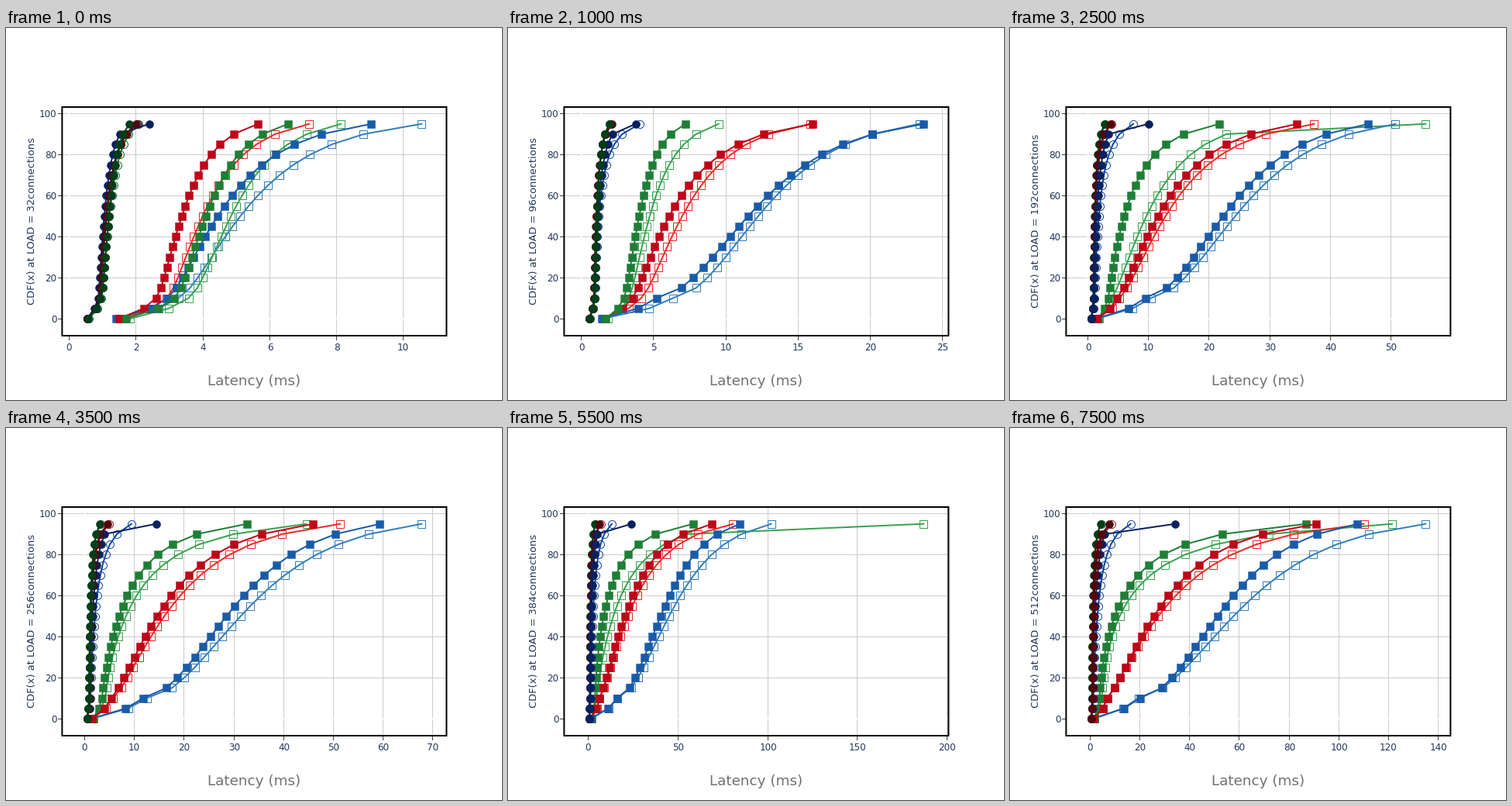
A matplotlib script that plays this animation: 640 px wide and 480 px high, repeating every 8000 ms.

```python
import numpy as np
import matplotlib.pyplot as plt
from matplotlib.animation import FuncAnimation
from matplotlib.patches import Rectangle

INTERVAL = 500
PT = 0.72  # points per pixel at 100 dpi
LEFT, RIGHT, TOP, BOTTOM = 72.4, 568.4, 102, 397
FIRST, LAST = 104.8, 536.2  # where the smallest and largest latency sit
INK, GRID = "#22365a", "#cccccc"
LEVELS = np.arange(0, 100, 5)

# Slowest regular latency (ms) at each load step; everything scales with it.
PACE = [10.54, 17, 23.4, 29.2, 41, 50.75, 57.8, 67.7,
        69.5, 80.9, 96.2, 101.9, 108, 114, 122, 134.8]
KEY_PACE = np.log([PACE[0], PACE[2], PACE[-1]])
SPIKES = {5: 55.7, 11: 186.8}  # outliers of the open green squares

# (marker, filled, hue): colour, minimum, then the 10th, 50th and 95th
# percentile at light, moderate and full load; a fourth value lifts the last point.
SERIES = {
    "s-r": ("#ec2a26", 1.6, (2.92, 3.99, 7.18), (4.13, 6.98, 15.85), (7, 27.5, 110)),
    "s-g": ("#38a34f", 1.83, (3.57, 4.84, 8.13), (3.28, 4.73, 9.5), (4.8, 12, 121.4)),
    "s-b": ("#337ebd", 1.5, (3.27, 5.12, 10.54), (6.34, 12.25, 23.4), (19.45, 57.7, 134.8)),
    "s+r": ("#be0619", 1.5, (2.6, 3.37, 5.65), (3.55, 6.08, 16), (7, 25.7, 91)),
    "s+g": ("#1f7e36", 1.7, (3.15, 4.09, 6.55), (2.95, 4, 7.2), (3.9, 9.95, 86.8)),
    "s+b": ("#1a5ba8", 1.4, (2.94, 4.44, 9.04), (5.2, 11.55, 23.7), (20.1, 51.2, 107.5)),
    "o-r": ("#a50f15", 0.55, (0.92, 1.12, 2.05), (0.88, 1.05, 2), (1.1, 1.5, 8.8)),
    "o-g": ("#0b6b2c", 0.6, (0.97, 1.2, 2.08), (0.9, 1.07, 1.95), (0.9, 1.25, 4.5)),
    "o-b": ("#0f459c", 0.55, (0.9, 1.1, 2.02), (0.95, 1.2, 4.03), (1.4, 3, 16.35)),
    "o+r": ("#55020d", 0.55, (0.92, 1.12, 2), (0.88, 1.03, 2.1), (1.1, 1.4, 7.9)),
    "o+g": ("#043d19", 0.56, (0.95, 1.19, 1.8), (0.9, 1.07, 1.93), (0.9, 1.2, 4.2)),
    "o+b": ("#08215f", 0.54, (0.87, 1.05, 1.75, 2.39), (0.9, 1.13, 2.8, 3.76),
            (1, 2, 8.5, 34.2)),
}
# Stacking of hues, bottom to top, for squares and circles
ORDER = {0: ("brg", "brg"), 2: ("rbg", "brg"), 5: ("gbr", "grb"),
         7: ("bgr", "brg"), 9: ("brg", "brg"), 11: ("grb", "grb"),
         15: ("bgr", "gbr")}


def tail(p):
    """Heavy-tailed quantile curve."""
    return (1 - p / 100) ** -0.3 - 1


def quantiles(low, p10, p50, p95):
    """Bend the tail curve through three percentiles; short foot below 10 %."""
    u = (tail(LEVELS[2:]) - tail(10)) / (tail(95) - tail(10))
    mid = (tail(50) - tail(10)) / (tail(95) - tail(10))
    power = np.log((p50 - p10) / (p95 - p10)) / np.log(mid)
    foot = [low, low + 0.66 * (p10 - low)]
    return np.concatenate([foot, p10 + (p95 - p10) * u ** power])


def latencies(step):
    data = {}
    pace = np.log(PACE[step])
    for key, (_, low, *rows) in SERIES.items():
        p10, p50, p95, *last = (np.exp(np.interp(pace, KEY_PACE, np.log(col)))
                                for col in zip(*rows))
        if key == "s-g" and step in SPIKES:
            p50, last = p50 * 1.35, [SPIKES[step]]
        data[key] = quantiles(low, p10, p50, p95)
        if last:
            data[key][-1] = last[0]
    return data


def tick_step(span):
    rough = span / 9
    base = 10 ** np.floor(np.log10(rough))
    return next(int(round(n * base)) for n in (1, 2, 5, 10) if n * base >= rough)


def ypix(v):
    return 375 - 2.645 * v


def crisp(v):
    return np.floor(v) + 0.5


fig = plt.figure(figsize=(6.4, 4.8), dpi=100, facecolor="white")
ax = fig.add_axes([0, 0, 1, 1])
ax.set_xlim(0, 640)
ax.set_ylim(480, 0)
ax.axis("off")


def stroke(xs, ys, color, width, z):
    return ax.plot(xs, ys, color=color, lw=width * PT, zorder=z,
                   solid_capstyle="butt", snap=False)[0]


def label(x, y, s, px, color=INK, **kw):
    return ax.text(x, y, s, fontsize=px * PT, color=color,
                   family="DejaVu Sans", **kw)


for v in range(0, 101, 20):
    y = crisp(ypix(v))
    if v:
        stroke([LEFT, RIGHT], [y, y], GRID, 1, 1)
    stroke([67, LEFT], [y, y], "#444444", 1, 1)
    label(65.5, y + 4.2, str(v), 12, ha="right", va="baseline")
stroke([LEFT, RIGHT], [ypix(0)] * 2, "white", 2, 2)
ax.add_patch(Rectangle((LEFT, TOP), RIGHT - LEFT, BOTTOM - TOP, fill=False,
                       ec="black", lw=2 * PT, zorder=3, snap=False))
label(320, 461, "Latency (ms)", 18.4, "#707070", ha="center", va="baseline")
ylabel = label(33.5, 249, "", 13, rotation=90, ha="center", va="center")

live = []


def draw(step):
    while live:
        live.pop().remove()
    data = latencies(step)
    lo = min(v[0] for v in data.values())
    hi = max(v[-1] for v in data.values())
    scale = (LAST - FIRST) / (hi - lo)

    def xpix(v):
        return FIRST + (v - lo) * scale

    dt = tick_step((RIGHT - LEFT) / scale)
    v = 0
    while xpix(v) < RIGHT:
        x = crisp(xpix(v))
        color, width = (GRID, 1) if v else ("white", 2)
        live.append(stroke([x, x], [TOP, BOTTOM], color, width, width))
        live.append(stroke([x, x], [BOTTOM, 403], "#444444", 1, 1))
        live.append(label(x, 415.5, str(v), 12, ha="center", va="baseline"))
        v += dt

    order = ORDER[max(k for k in ORDER if k <= step)]
    z = 4
    for shape, hues in zip("so", order):
        for fill in "-+":
            for hue in hues:
                key = shape + fill + hue
                color = SERIES[key][0]
                full = fill == "+"
                live.extend(ax.plot(
                    xpix(data[key]), ypix(LEVELS), color=color, lw=2 * PT,
                    marker=shape, ms=10 * PT, mec=color,
                    mfc=color if full else "none",
                    mew=0.5 * PT if full else PT, zorder=z))
                z += 1
    ylabel.set_text(f"CDF(x) at LOAD = {32 * (step + 1)}connections")
    return live


anim = FuncAnimation(fig, draw, frames=len(PACE), interval=INTERVAL,
                     repeat=True, repeat_delay=0, blit=False)
plt.show()
```
